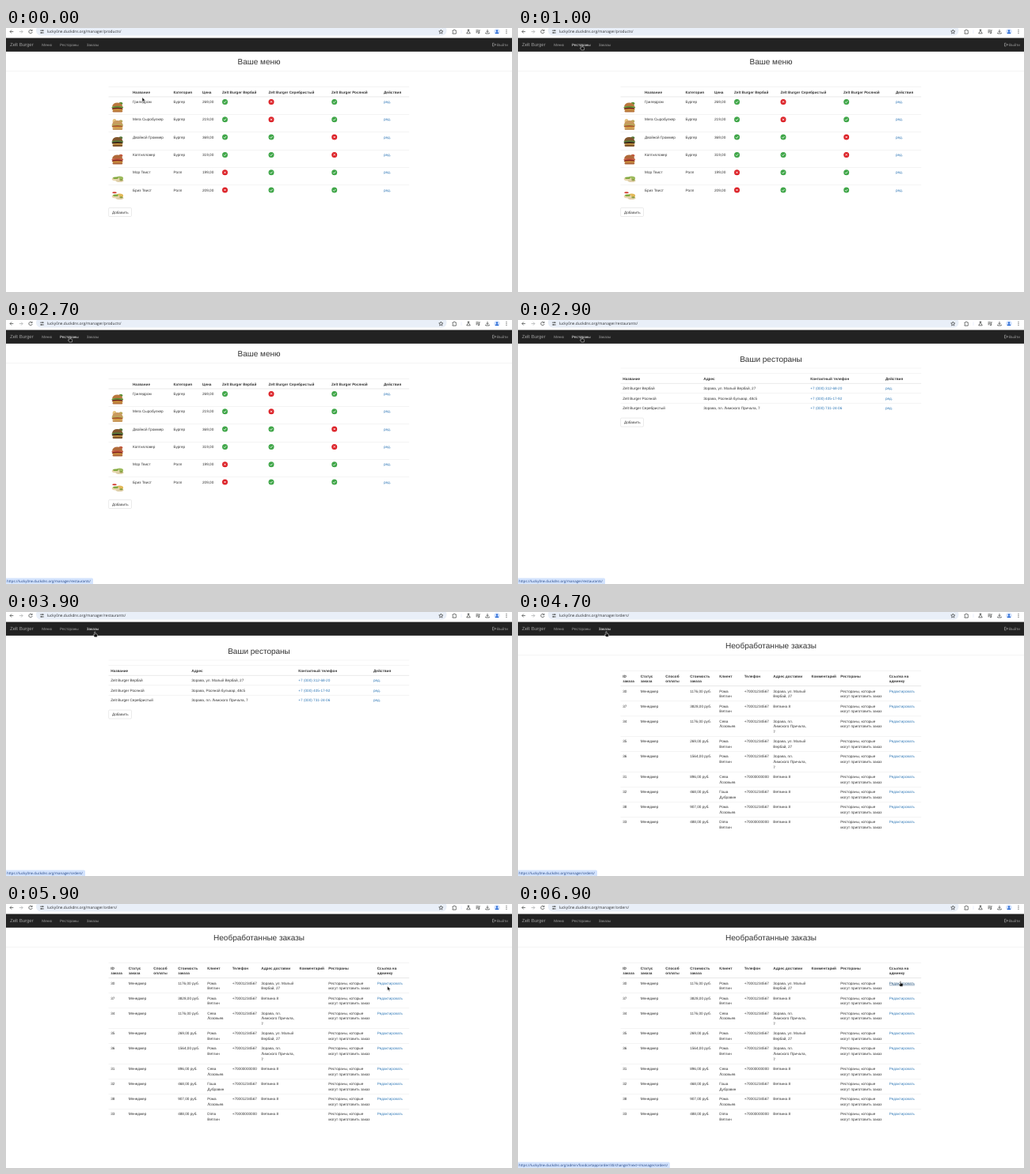
Write an HTML page that moves like this. It is 639x334 px and loops after 8000 ms.

```html
<!DOCTYPE html>
<html lang="ru">
<head>
<meta charset="utf-8">
<style>
  html, body { margin: 0; width: 100%; height: 100%; overflow: hidden; background: #fff; }
  svg { display: block; width: 639px; height: 334px; }
  text { font: 4.667px "Liberation Sans", Arial, sans-serif; fill: #333; text-rendering: geometricPrecision; white-space: pre; }
  .b { font-weight: 700; }
  .h2 { font-size: 10px; text-anchor: middle; }
  .a { fill: #337ab7; }
  .a.on { fill: #23527c; text-decoration: underline; }
  .nav { fill: #9d9d9d; }
  .nav.on { fill: #fff; }
  .brand { font-size: 6px; }
  .ui { font-family: "Open Sans", "Noto Sans", sans-serif; font-size: 4.8px; fill: #2b2d30; }
  .tip { font-size: 4.4px; fill: #1c3f80; }
  .ic { fill: none; stroke: #444746; stroke-width: .75; }
</style>
</head>
<body>
<svg id="stage" viewBox="0 0 639 334"></svg>
<script>
const ROW = 22.333, LINE = 6.667, LEFT = 129.5, RIGHT = 509.2;
const host = 'lucky0ne.duckdns.org/';

const text = (x, y, s, cls = '', more = '') => `<text x="${x}" y="${y}" class="${cls}" ${more}>${s}</text>`;
const rect = (x, y, w, h, fill, more = '') => `<rect x="${x}" y="${y}" width="${w}" height="${h}" fill="${fill}" ${more}/>`;
const oval = (x, y, rx, ry, fill) => `<ellipse cx="${x}" cy="${y}" rx="${rx}" ry="${ry}" fill="${fill}"/>`;
const path = (d, more = '') => `<path d="${d}" ${more}/>`;
const rule = (y, h = .333) => rect(LEFT, y, RIGHT - LEFT, h, '#ddd');
// A cell may hold several lines separated by "|".
const cell = (x, y, s, cls) => s.split('|').map((l, i) => text(x, y + i * LINE, l, cls)).join('');
const head = (xs, names, top, lines = 1) =>
  rule(top) + names.map((n, i) => cell(xs[i], top + 8.3, n, 'b')).join('') + rule(top + 5.7 + lines * LINE, .667);
const title = (s, y, x0, x1) => text(319.5, y, s, 'h2') + rect(x0, y + 8.3, x1 - x0, .4, '#e6e6e6');
const button = y => rect(129.6, y, 28.9, 11, '#fff', 'stroke="#ccc" stroke-width=".4" rx="1.3"') + text(134, y + 7.2, 'Добавить');

const mark = (x, y, ok) => oval(x, y, 3.5, 3.5, ok ? '#3fa648' : '#dc2026') +
  path(ok ? `M${x - 1.6} ${y + .1}l1.2 1.2 2-2.4` : `M${x - 1.2} ${y - 1.2}l2.4 2.4m0-2.4l-2.4 2.4`,
    'fill="none" stroke="#fff" stroke-width=".8"');

function burger(y, bun, mid, green) {
  return oval(145, y - 5, 2.4, 1.8, green) +
    path(`M134 ${y - 1}q1-5 6.5-5t7 5z`, `fill="${bun}"`) +
    oval(140.8, y, 7.4, 1.7, green) + oval(140.6, y + 1.6, 7, 1.7, mid) +
    oval(141, y + 3, 6.7, 1, '#d9a441') + rect(134.6, y + 3.4, 12.6, 2.5, bun, 'rx="1.2"');
}
function wrap(y, side) {
  return oval(143.5, y - 1, 4.6, 2.6, side) + oval(138.5, y, 4.8, 2.3, '#e8d7ae') +
    oval(138.5, y - 1.2, 3.4, 1.2, '#7fa83f') + oval(143.5, y + 2.2, 5, 1.8, '#dfcfaa') + oval(145.5, y + 1.2, 2.2, 1, '#8a9b3e');
}

function menuPage() {
  const xs = [160, 211.5, 248, 273, 331.5, 411, 477], top = 74.3;
  const rows = [
    ['Гриледром', '269,00', '101', burger(100.5, '#b9773c', '#7a2f22', '#5d9136')],
    ['Мега Сыробулкер', '219,00', '101', oval(137, 118, 2.4, 3, '#e5c37e') + burger(123, '#c99a5e', '#a9582f', '#b9a85a')],
    ['Двойной Громмер', '369,00', '110', burger(144, '#80552c', '#3f261b', '#55793a')],
    ['Коптилловер', '319,00', '110', burger(166.5, '#b06a3a', '#8c2f25', '#c35a3f')],
    ['Мор Твист', '199,00', '011', wrap(191, '#9cba5c')],
    ['Бриз Твист', '209,00', '011', oval(137, 208.2, 2.8, 1, '#d23b2e') + wrap(213, '#e3b958')]
  ];
  return title('Ваше меню', 45.7, 0, 639) +
    head(xs, ['Название', 'Категория', 'Цена', 'Zelt Burger Вербай', 'Zelt Burger Серебристый', 'Zelt Burger Росяной', 'Действия'], top) +
    rows.map(([name, price, stock, pic], i) => {
      const y = 95 + i * ROW;
      return (i ? rule(y - 8) : '') + pic + text(160, y, name) + text(211.5, y, i < 4 ? 'Бургер' : 'Ролл') + text(248, y, price) +
        [276.5, 335, 414.7].map((x, k) => mark(x, y - 1.6, +stock[k])).join('') + text(477, y, 'ред.', 'a');
    }).join('') + button(227.5);
}

function placesPage() {
  const xs = [132.2, 234.3, 369.3, 464];
  const rows = [
    ['Zelt Burger Вербай', 'Зорава, ул. Малый Вербай, 27', '+7 (000) 312-68-20'],
    ['Zelt Burger Росяной', 'Зорава, Росяной бульвар, 48с5', '+7 (000) 405-17-92'],
    ['Zelt Burger Серебристый', 'Зорава, пл. Лимского Причала, 7', '+7 (000) 731-24-06']
  ];
  return title('Ваши рестораны', 52.5, LEFT, RIGHT) +
    head(xs, ['Название', 'Адрес', 'Контактный телефон', 'Действия'], 67.5) +
    rows.map((r, i) => {
      const y = 88.3 + i * 12.333;
      return (i ? rule(y - 8) : '') + [...r, 'ред.'].map((s, k) => text(xs[k], y, s, k > 1 ? 'a' : '')).join('');
    }).join('') + button(124);
}

function ordersPage() {
  const xs = [132.2, 154.7, 186.3, 217.2, 254.3, 285.7, 322.3, 370.6, 407.3, 468.8];
  const phones = ['+70001234567', '+70000000000'];
  const places = ['Зорава, ул. Малый|Вербай, 27', 'Ветвина 8', 'Зорава, пл.|Лимского Причала,|7'];
  const rows = [
    [30, 1176, 'Рома|Ветлин', 0, 0], [37, 3828, 'Рома|Ветлин', 0, 1], [34, 1176, 'Сева|Лозовьев', 0, 2],
    [35, 269, 'Рома|Ветлин', 0, 0], [36, 1564, 'Рома|Ветлин', 0, 2], [31, 896, 'Сева|Лозовьев', 1, 1],
    [32, 468, 'Гоша|Дубравин', 0, 1], [38, 907, 'Рома|Лозовьев', 0, 1], [33, 488, 'Dima|Ветлин', 1, 1]
  ];
  let y = 101.7;
  return title('Необработанные заказы', 45.7, 0, 639) +
    head(xs, ['ID|заказа', 'Статус|заказа', 'Способ|оплаты', 'Стоимость|заказа', 'Клиент', 'Телефон', 'Адрес доставки', 'Комментарий', 'Рестораны', 'Ссылка на|админку'], 74.3, 2) +
    rows.map(([id, cost, who, phone, place], i) => {
      const cells = ['' + id, 'Менеджер', '', cost + ',00 руб.', who, phones[phone], places[place], '', 'Рестораны, которые|могут приготовить заказ', 'Редактировать'];
      const out = (i ? rule(y - 8) : '') + cells.map((s, k) => cell(xs[k], y, s, k == 9 ? 'a edit' : '')).join('');
      y += place == 2 ? 25.667 : 19;
      return out;
    }).join('');
}

function toolbar() {
  const ic = (d, more = '') => path(d, `class="ic" ${more}`);
  return rect(0, 0, 639, 12.6, '#fff') + rect(38, -3, 518.5, 12.4, '#e9eff8', 'rx="6"') +
    ic('M9.3 4.6H5m2-2l-2 2 2 2') + ic('M16.8 4.6h4.3m-2-2l2 2-2 2', 'style="stroke:#a9abad"') +
    ic('M32.8 3.3A2.2 2.2 0 1 0 33.2 5M33.1 2v1.6h-1.6', 'id="reload"') + ic('M29.2 2.8l3.6 3.6m0-3.6l-3.6 3.6', 'id="stop"') +
    ic('M43 3.2h2m2 0h1M43 6h1m2 0h2') + oval(46, 3.2, .9, .9, '#444746') + oval(45, 6, .9, .9, '#444746') +
    ic('M549.3 2.1l.8 1.7 1.8.2-1.4 1.2.4 1.9-1.6-1-1.6 1 .4-1.9-1.4-1.2 1.8-.2z', 'stroke-width=".5"') +
    ic('M564 3h1.4a.8.8 0 0 1 1.6 0h1.3v1.5a.8.8 0 0 1 0 1.4v1.3H564V6a.8.8 0 0 0 0-1.5z') +
    rect(574.8, 2.5, .4, 4.5, '#c8d8f2') +
    ic('M582.8 2.2h2.4m-1.8 0v1.9l-1.7 2.8h4.6l-1.7-2.8V2.2') +
    ic('M593.5 2.8h3.4m-3.4 1.5h3.4m-3.4 1.5h2m2.2.6V2.8h1') + oval(597, 6.4, .8, .8, '#444746') +
    ic('M608 2v3.4m-1.5-1.5l1.5 1.5 1.5-1.5M605.7 5.8v1.2h4.6V5.8') +
    oval(620, 4.6, 3.7, 3.7, '#d3e3fd') + oval(620, 3.6, 1.2, 1.2, '#1a5fd0') + path('M617.6 7q0-1.8 2.4-1.8t2.4 1.8z', 'fill="#1a5fd0"') +
    [2.6, 4.6, 6.6].map(y => oval(632, y, .6, .6, '#444746')).join('') +
    text(51.8, 6.4, '', 'ui', 'id="url"');
}

const navbar = rect(0, 12.6, 639, 17.1, '#222') + rect(0, 29.4, 639, .4, '#080808') + text(5, 23.3, 'Zelt Burger', 'nav brand') +
  [[45.3, 'Меню'], [68.1, 'Рестораны'], [101.7, 'Заказы']].map(([x, s]) => text(x, 22.9, s, 'nav link')).join('') +
  path('M616.3 19.2h-1.8v3.8h1.8M615.8 21.1h2.7m-1.3-1.4l1.4 1.4-1.4 1.4', 'fill="none" stroke="#9d9d9d" stroke-width=".7"') +
  text(620.1, 22.9, 'Выйти', 'nav');

const skin = 'fill="#111" stroke="#fff" stroke-width=".45" stroke-linejoin="round"';
const stage = document.getElementById('stage');
stage.innerHTML = [menuPage, placesPage, ordersPage].map(p => `<g class="page">${p()}</g>`).join('') + toolbar() + navbar +
  `<g id="status">${path('', 'id="bubble" fill="#d3e3fd"')}${text(1, 331.7, '', 'ui tip', 'id="tip"')}</g>` +
  path('M0 0V5.4L1.3 4.3 2.2 6.4 3.2 6 2.3 4H4z', `id="arrow" ${skin}`) +
  path('M-.6.3Q0-.4.6.3V2.6L2.6 3.1Q3.3 3.4 3.2 4.2L2.8 6.7H-.5L-2.2 4.2Q-2 3.3-.6 4.1z', `id="hand" ${skin}`);

const $ = id => document.getElementById(id);
const pages = document.querySelectorAll('.page'), links = document.querySelectorAll('.link');
const edit = document.querySelector('.edit');
const show = (el, on) => { el.style.display = on ? '' : 'none'; };

// Pointer path: time, x, y
const track = [
  [0, 172, 87.8], [100, 174, 87], [600, 59, 32], [800, 74, 21], [900, 77, 20], [1000, 80.5, 21.2],
  [3600, 80.5, 21.2], [3900, 112.3, 25], [4200, 112.3, 25], [4300, 111.5, 24.6], [5000, 111.5, 24.6],
  [5500, 400, 84], [5800, 476, 101], [5900, 481.6, 104], [6300, 483, 97.6], [6400, 483, 97.6], [6500, 481.6, 97.6],
  [6700, 481.6, 97.6], [6800, 488, 97.8], [6900, 483, 97.6], [8000, 483, 97.6]
];
function pointer(t) {
  const i = track.findIndex(k => k[0] > t), [t0, x0, y0] = track[i - 1], [t1, x1, y1] = track[i];
  const f = (t - t0) / (t1 - t0);
  return [x0 + (x1 - x0) * f, y0 + (y1 - y0) * f];
}

function statusAlpha(t) {
  if (t < 1200 || t == 2800) return 0;
  if (t == 1200 || t == 5200 || t == 6200) return .5;
  return t < 5200 || t > 6200 ? 1 : 0;
}

function draw(now) {
  const t = Math.floor(now % 8000 / 100) * 100;
  const page = t < 2800 ? 0 : t < 4600 ? 1 : 2;
  const [x, y] = pointer(t);
  const onNav = y > 13 && y < 29.7;
  const nav = onNav && x > 63 && x < 97 ? 1 : onNav && x >= 97 && x < 121 ? 2 : -1;
  const onEdit = page == 2 && x > 468 && x < 501 && y > 96 && y < 102.8;
  const hand = nav > 0 || onEdit;

  pages.forEach((p, i) => show(p, i == page));
  links.forEach((l, i) => l.classList.toggle('on', i == nav));
  edit.classList.toggle('on', onEdit);
  $('url').textContent = host + 'manager/' + ['products/', 'restaurants/', 'orders/'][page];

  const loading = t == 2800 || t == 4500 || t == 4600;
  show($('reload'), !loading);
  show($('stop'), loading);

  const [dest, w] = t < 3800 ? ['manager/restaurants/', 110] : t < 6000 ? ['manager/orders/', 100] :
    ['admin/foodcartapp/order/30/change/?next=/manager/orders/', 191.7];
  $('tip').textContent = 'https://' + host + dest;
  $('bubble').setAttribute('d', `M0 326.4H${w - 1.5}q1.5 0 1.5 1.5V334H0z`);
  $('status').style.opacity = statusAlpha(t);

  show($('arrow'), !hand);
  show($('hand'), hand);
  $(hand ? 'hand' : 'arrow').setAttribute('transform', `translate(${x} ${y})`);
}

const start = performance.now();
(function tick() {
  draw(performance.now() - start);
  requestAnimationFrame(tick);
})();
</script>
</body>
</html>
```
